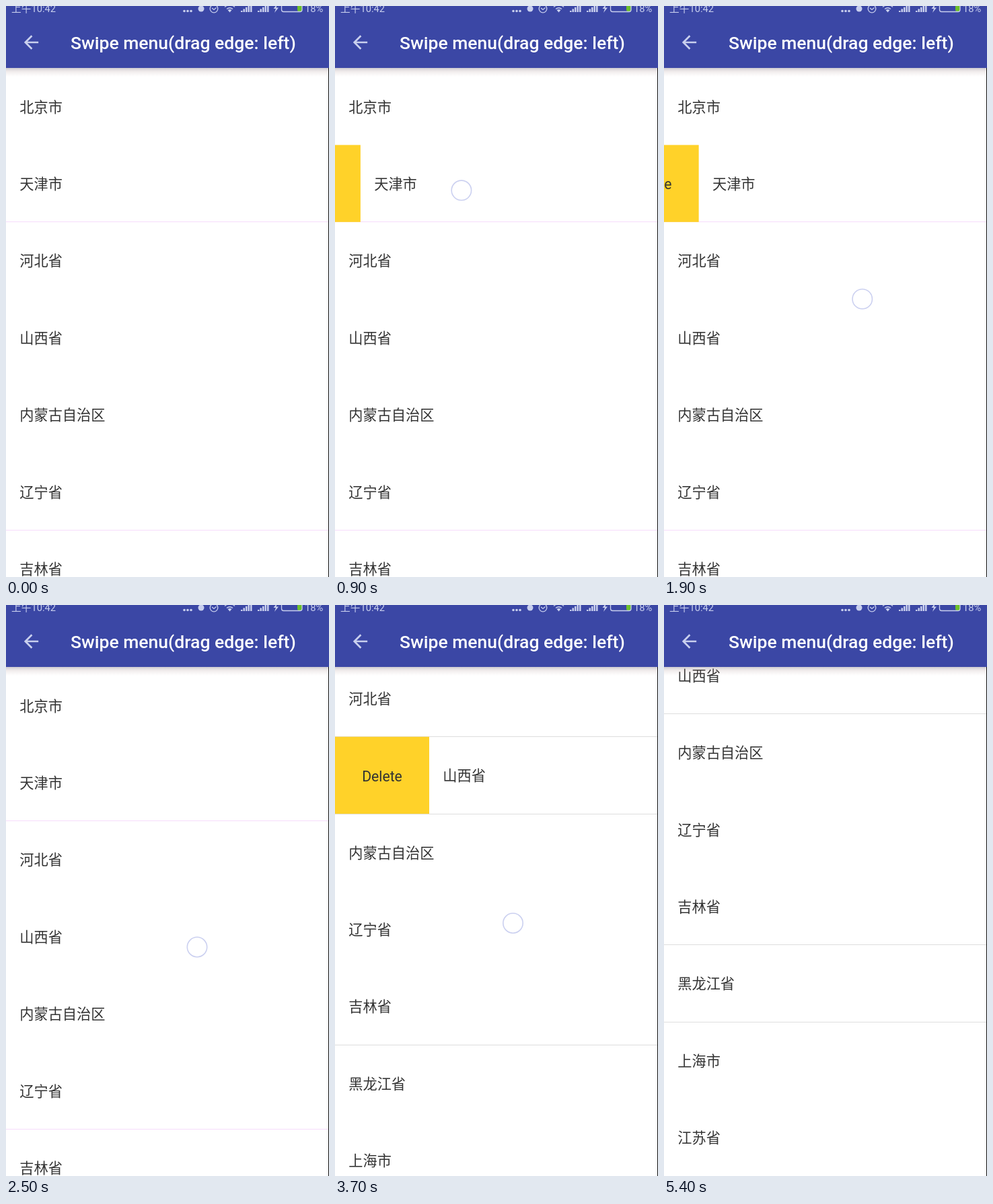
An HTML page for the animation above (5.5 s loop, 480x848 px).

```html
<!DOCTYPE html>
<html lang="zh-CN">
<head>
<meta charset="utf-8">
<title>Swipe menu</title>
<style>
  html, body { margin: 0; width: 100%; height: 100%; overflow: hidden; background: #fff; }
  svg { display: block; width: 480px; height: 848px; }
  text { font-family: Roboto, "Noto Sans CJK SC", "Noto Sans CJK", sans-serif; white-space: pre; }
  .row text { font-size: 21.2px; fill: #333; }
  .title { font-size: 26.5px; font-weight: 500; fill: #fff; }
  .status { fill: #c9d0ee; }
  .status text { font-size: 14.7px; }
  .wire { fill: none; stroke: #c9d0ee; stroke-width: 1.3; }
</style>
</head>
<body>
<svg viewBox="0 0 480 848">
  <defs>
    <linearGradient id="shade" x2="0" y2="1">
      <stop offset="0" stop-color="#6a6478" stop-opacity=".34"/>
      <stop offset=".4" stop-color="#a08484" stop-opacity=".16"/>
      <stop offset="1" stop-color="#c0a098" stop-opacity="0"/>
    </linearGradient>
  </defs>
  <rect width="480" height="848" fill="#fff"/>
  <g id="lines"></g>
  <g id="rows"></g>
  <rect y="92" width="480" height="13" fill="url(#shade)"/>
  <rect x="479" y="92" width="1" height="756" fill="#111"/>
  <rect width="480" height="92" fill="#3b47a5"/>
  <g class="status">
    <text x="8" y="9">上午10:42</text>
    <text x="444" y="9">18%</text>
    <g id="dots"></g>
    <circle cx="290" cy="4" r="4.5"/>
    <circle class="wire" cx="309" cy="4" r="5.8"/>
    <path class="wire" d="M306 3l3 2.500 3.500-3"/>
    <path class="wire" d="M325 1.500q7.500-6 15 0M328 4.500q4.500-3.500 9 0"/>
    <path d="M329.500 6q3-2 6 0l-3 3.500z"/>
    <g id="bars"></g>
    <path d="M403-3l-5.500 7h3.500l-2 6 6-7.500h-3.500z"/>
    <rect x="433" y="-3" width="7" height="11" rx="2" fill="#6cc02c"/>
    <rect class="wire" x="409.500" y="-4" width="30.500" height="12.500" rx="3"/>
  </g>
  <path fill="#c9d0ee" transform="translate(21.500 38) scale(1.333)"
    d="M20 11H7.830l5.590-5.590L12 4l-8 8 8 8 1.410-1.410L7.830 13H20v-2z"/>
  <text class="title" x="96" y="64">Swipe menu(drag edge: left)</text>
  <circle id="touch" r="14.700" fill="#fff" fill-opacity=".7" stroke="#cbd0f0" stroke-width="1.600"/>
</svg>
<script>
const LOOP = 5500, STEP = 100, TOP = 92, PITCH = 114.4, MENU = 140, CLOSE = 340;
const names = ['北京市', '天津市', '河北省', '山西省', '内蒙古自治区', '辽宁省',
  '吉林省', '黑龙江省', '上海市', '江苏省', '浙江省'];

const clamp = v => Math.min(1, Math.max(0, v));
const smooth = p => p * p * (3 - 2 * p);
const flick = p => p ** 3;

// A finger opens a row's menu, flicks it shut, or scrolls the list
const gestures = [
  { at: 800, span: 400, from: [150, 275], to: [392.5, 267.5], opens: 1 },
  { at: 1700, span: 400, from: [291, 494], to: [321, 23], closes: 1 },
  { at: 2500, span: 300, from: [284, 508], to: [297.5, 268.5], scrolls: true },
  { at: 3100, span: 400, from: [180, 264], to: [369, 259], opens: 3 },
  { at: 3700, span: 400, from: [264.5, 472.5], to: [313, 212], closes: 3 },
  { at: 4400, span: 300, from: [290, 420], to: [305, 271.5], scrolls: true }
];

function finger(g, t) {
  const ease = g.closes ? flick : smooth;
  const p = ease(clamp((t - g.at) / g.span));
  return g.from.map((v, i) => v + (g.to[i] - v) * p);
}

const scrollAt = t => gestures.filter(g => g.scrolls)
  .reduce((sum, g) => sum + g.from[1] - finger(g, t)[1], 0);

function menuAt(row, t) {
  let x = 0;
  for (const g of gestures) {
    if (t < g.at) break;
    if (g.opens === row) x = Math.min(MENU, finger(g, t)[0] - g.from[0]);
    if (g.closes === row) x = MENU * (1 - smooth(clamp((t - g.at) / CLOSE)));
  }
  return x;
}

// Hairlines are thinner than a pixel, so only some rows show theirs
const lineShows = (row, scroll) => (row * 0.28 + 0.805 + scroll * 0.0194) % 1 < 0.3;

const $ = id => document.getElementById(id);
function set(el, attrs) {
  for (const k in attrs) el.setAttribute(k, attrs[k]);
}
function add(parent, tag, attrs, text = '') {
  const el = document.createElementNS('http://www.w3.org/2000/svg', tag);
  set(el, attrs);
  el.textContent = text;
  return parent.appendChild(el);
}

for (let i = 0; i < 3; i++) add($('dots'), 'circle', { cx: 265 + i * 5, cy: 7.5, r: 1.8 });
for (let i = 0; i < 10; i++) {
  const n = i % 5, h = 2 + n * 2.6;
  add($('bars'), 'rect', { x: (i < 5 ? 349 : 374) + n * 3.5, y: 9 - h, width: 2.5, height: h });
}

const rows = names.map(name => {
  const line = add($('lines'), 'rect', { width: 479, height: 1 });
  const row = add($('rows'), 'g', { class: 'row' });
  add(row, 'rect', { x: -MENU, width: MENU, height: PITCH, fill: '#ffd229' });
  add(row, 'text', { x: -MENU / 2, y: 66, 'text-anchor': 'middle' }, 'Delete');
  add(row, 'text', { x: 20.3, y: 65.5 }, name);
  return { line, row };
});

function draw(now) {
  const t = Math.floor((now % LOOP) / STEP) * STEP;
  const scroll = scrollAt(t);

  rows.forEach(({ line, row }, i) => {
    const y = TOP + i * PITCH - scroll;
    set(row, { transform: `translate(${menuAt(i, t)} ${y})` });
    set(line, {
      y: Math.floor(y + PITCH),
      fill: scroll ? '#dedede' : '#f7dcfb',
      visibility: lineShows(i, scroll) ? 'visible' : 'hidden'
    });
  });

  const g = gestures.find(g => t >= g.at && t <= g.at + g.span);
  set($('touch'), { visibility: g ? 'visible' : 'hidden' });
  if (g) {
    const [cx, cy] = finger(g, t);
    set($('touch'), { cx, cy });
  }
}

const start = performance.now();
function tick() {
  draw(performance.now() - start);
  requestAnimationFrame(tick);
}
tick();
</script>
</body>
</html>
```
